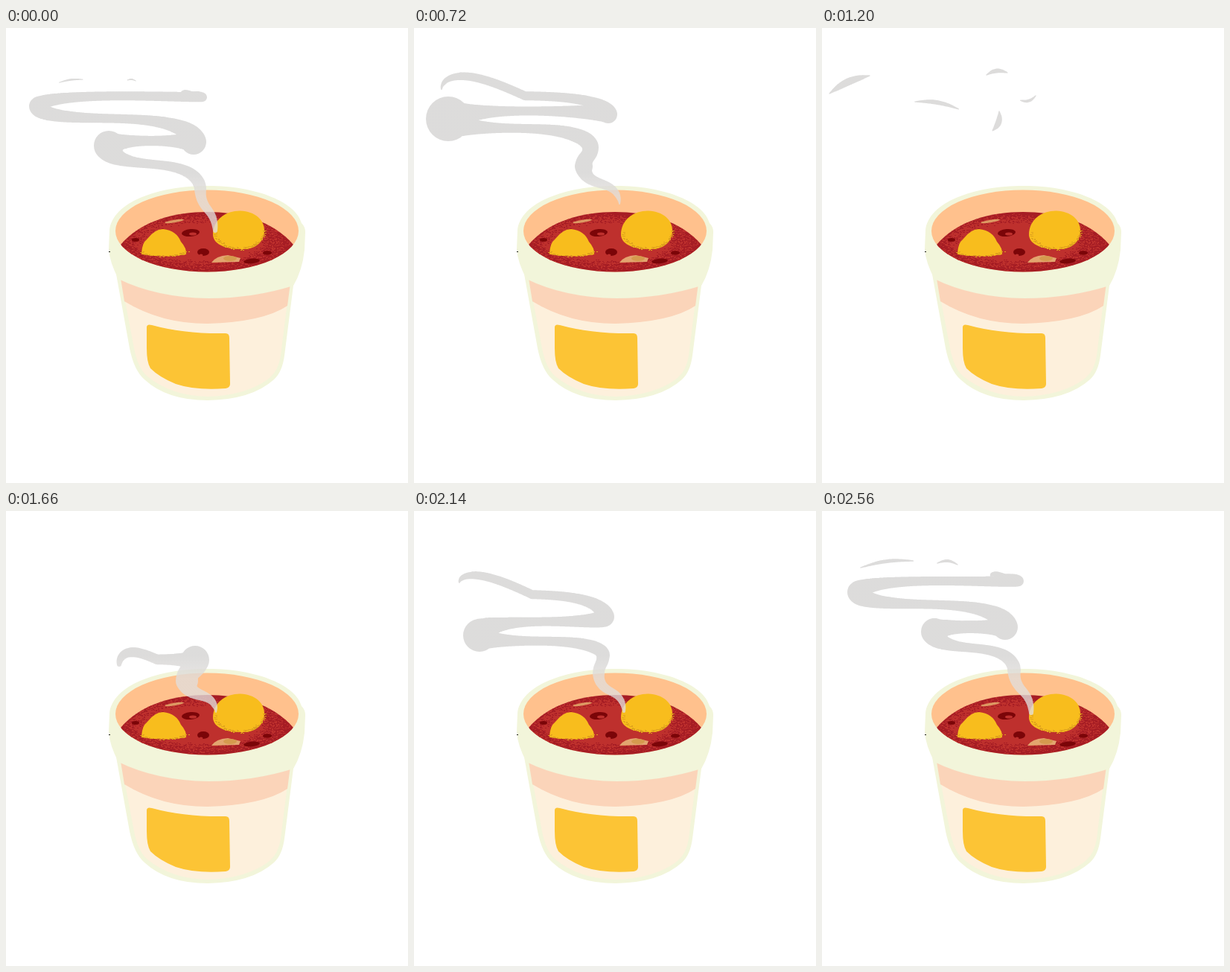
Animation of 540 by 611 pixels, one loop 2620 ms. Source, as an HTML page with a canvas:

```html
<!DOCTYPE html>
<html lang="en">
<head>
<meta charset="utf-8">
<title>Steaming soup</title>
<style>
html, body { margin: 0; width: 100%; height: 100%; overflow: hidden; background: #fff; }
canvas { display: block; }
</style>
</head>
<body>
<canvas id="stage" width="540" height="611"></canvas>
<script>
const W = 540, H = 611, LOOP = 2620;
const stage = document.getElementById('stage').getContext('2d');
const cup = document.createElement('canvas');
cup.width = W;
cup.height = H;

const lerp = (a, b, k) => a + (b - a) * k;
const clamp = (v, lo, hi) => Math.max(lo, Math.min(hi, v));

// The steam is one ribbon of bends that are born at the soup, rise and die at
// the top. A pose names its oldest bend, then gives [x, y, radius] down to the
// base. Bends already gone sit at the tip, bends still to come sit at the base.
const BENDS = 8, NECK = 6;

function pose(time, oldest, bends, thick = 1, cut = 0) {
  const last = bends.length - 1;
  const slots = Array.from({ length: BENDS }, (_, i) => {
    const n = i === BENDS - 1 ? last : clamp(i - oldest, 0, last);
    return [...bends[n], n === 0 ? 1 : 0];
  });
  return { time, slots, thick, cut };
}

const tall = [[236,88,1], [264,93,6], [43,105,12], [252,153,17], [138,158,20], [261,217,8], [281,272,3]];
const lifting = [[37,82,1], [261,116,12], [46,122,30], [237,161,11], [228,186,12], [276,236,1]];
const risen = lifting.map(([x, y, r]) => [x - 12, y - 14, r]);

const poses = [
  pose(0, 0, tall),
  pose(360, 2, [[49,98,1], [257,129,18], [84,142,32], [255,199,10], [251,222,11], [282,273,3]]),
  pose(720, 2, lifting),
  pose(1140, 2, risen, 0, 0.45),
  pose(1360, 0, [[281,270,1]], 0),
  pose(1660, 0, [[152,206,3], [254,200,19], [243,228,15], [282,270,1]]),
  pose(2140, 0, [[61,96,1], [256,142,13], [88,167,22], [254,194,9], [248,219,8], [282,269,2]]),
  pose(2560, 0, [[227,87,1], [264,94,7], [49,109,15], [246,156,17], [151,162,18], [258,214,9], [281,271,3]]),
  pose(LOOP, 0, tall)];

// Loose wisps: peak time, both ends, radius in the middle.
const wisps = [
  [360, 160, 77, 222, 83, 3],
  [1200, 10, 88, 64, 64, 5],
  [1200, 221, 63, 249, 60, 3],
  [1200, 125, 99, 184, 109, 3],
  [1200, 287, 91, 266, 97, 2],
  [1200, 238, 112, 229, 138, 4],
  [2560, 52, 76, 123, 67, 2.5],
  [2560, 155, 70, 182, 72, 2]];

function disc(path, x, y, r) {
  if (r < 0.5) return;
  path.moveTo(x + r, y);
  path.arc(x, y, r, 0, 7);
}

// Swings sideways from bend to bend, flat in between, with a wave in the tail.
function addRibbon(path, { slots, thick, cut }) {
  const end = (BENDS - 1) * (1 - cut);
  for (let i = 0; i < BENDS - 1; i++) {
    const [ax, ay, ar, wave] = slots[i], [bx, by, br] = slots[i + 1];
    const dx = Math.abs(bx - ax), dy = Math.abs(by - ay), length = Math.hypot(dx, dy);
    const flat = dx / (dx + dy + 1), steps = Math.ceil(length * 1.5) + 1;
    for (let j = 0; j <= steps; j++) {
      const k = j / steps;
      if (i + k > end) return;
      const arch = Math.sin(Math.PI * k), turn = Math.sin(2 * Math.PI * k);
      const lift = dx / 200 * (7 * arch + 22 * wave * Math.max(0, turn));
      const r = lerp(lerp(ar, br, k), NECK, arch * Math.min(1, length / 120));
      disc(path, lerp(ax, bx, (1 - Math.cos(Math.PI * k)) / 2),
        lerp(ay, by, k + flat * turn / (2 * Math.PI)) - lift, r * thick);
    }
  }
}

// A bowed sliver that grows, then shrinks towards its middle.
function addWisp(path, t, [peak, ax, ay, bx, by, radius]) {
  const age = (t - peak + LOOP) % LOOP;
  const size = age < 120 ? 1 - age / 120 : 1 - (LOOP - age) / 240;
  if (size <= 0) return;
  const length = Math.hypot(bx - ax, by - ay);
  for (let d = 0; d <= length; d++) {
    const arch = Math.sin(Math.PI * d / length);
    const k = 0.5 + (d / length - 0.5) * size, bow = 4 * arch * size / length;
    disc(path, lerp(ax, bx, k) + (by - ay) * bow, lerp(ay, by, k) - (bx - ax) * bow,
      lerp(0.7, radius, arch) * size);
  }
}

const steamTone = stage.createLinearGradient(0, 195, 0, 225);
steamTone.addColorStop(0, 'rgba(212,211,210,.8)');
steamTone.addColorStop(1, 'rgba(225,222,220,.78)');

function drawSteam(t) {
  const i = poses.findIndex(p => t < p.time) - 1, a = poses[i], b = poses[i + 1];
  const k = (t - a.time) / (b.time - a.time);
  const path = new Path2D();
  addRibbon(path, {
    slots: a.slots.map((slot, n) => slot.map((v, m) => lerp(v, b.slots[n][m], k))),
    thick: lerp(a.thick, b.thick, k),
    cut: lerp(a.cut, b.cut, k)
  });
  wisps.forEach(wisp => addWisp(path, t, wisp));
  stage.fillStyle = steamTone;
  stage.fill(path);
}

function drawCup(c) {
  let seed = 7;
  const random = () => (seed = seed * 16807 % 2147483647) / 2147483647;

  function oval(color, x, y, rx, ry, turn = 0) {
    c.beginPath();
    c.ellipse(x, y, rx, ry, turn, 0, 7);
    c.fillStyle = color;
    c.fill();
  }
  function shape(color, path) {
    c.fillStyle = color;
    c.fill(new Path2D(path));
  }
  // Grains scattered around part of an oval's edge.
  function grains(color, count, x, y, rx, ry, spread, sweep = 2 * Math.PI) {
    c.fillStyle = color;
    for (let i = 0; i < count; i++) {
      const a = random() * sweep;
      const d = 1 + (random() + random() - 1) * spread;
      c.fillRect(Math.round(x + rx * d * Math.cos(a)), Math.round(y + ry * d * Math.sin(a)), 2, 1);
    }
  }

  const green = '#f2f5da', dark = '#a61d24', red = '#be302d', spot = '#7b0508', yolk = '#f8bd1d';

  // Body
  shape(green, 'M147 325 L166 430 Q172 460 186 472 Q216 500 271 500 Q330 499 360 472 Q371 462 374 440 L388 330 Z');
  shape('#fdf0dc', 'M153 330 L172 430 Q177 457 190 468 Q222 494 271 495 Q325 493 354 470 Q366 460 369 440 L382 335 Z');
  shape('#fbd4b9', 'M153 330 L159 367 Q208 397 270 397 Q345 395 378 373 L383 335 Z');
  shape('#fcc435', 'M189 402 Q189 397 196 399 Q240 411 295 410 Q300 410 300 416 L301 478 Q301 483 295 484 ' +
    'Q255 487 228 478 Q206 469 194 457 Q189 449 189 430 Z');

  // Rim and opening
  shape(green, 'M139 272 C143 234 203 212 271 212 C339 212 390 235 397 262 Q402 267 402 274 L401 298 ' +
    'Q398 326 386 346 Q332 363 272 363 Q202 362 151 337 Q139 314 138 297 Z');
  shape('#111', 'M138 300 h2 v1 h-2 Z');
  oval('#ffc18d', 270, 272.5, 123, 55);

  // Soup
  c.save();
  c.beginPath();
  c.ellipse(270, 272.5, 123, 55, 0, 0, 7);
  c.clip();
  c.clip(new Path2D('M154 291 C182 258 228 247 270 247 S358 258 386 291 V335 H154 Z'));
  c.fillStyle = dark;
  c.fillRect(140, 240, 260, 95);
  oval(red, 262, 287, 91, 30);
  grains(red, 1500, 264, 287, 98, 32, 0.22);
  grains(dark, 450, 264, 287, 87, 28, 0.14);
  c.restore();

  oval('#dd9963', 226, 259.5, 13, 1.8, -0.16);
  oval(spot, 248, 275, 12, 5, -0.08);
  oval(red, 251, 276.5, 5, 2);
  oval(spot, 265, 301, 8, 5);
  oval(red, 262, 305, 2.5, 1.5);
  oval(spot, 174, 284.5, 5, 2.5);
  oval(spot, 351, 302, 6, 2.8);
  oval(spot, 330, 313, 11, 3.2, -0.1);
  shape('#e3a56f', 'M276 315 Q282 306 298 305 L315 309 L313 314 Z');
  oval('#d59a4e', 301, 309.5, 9, 3.5);

  // Potatoes
  shape(yolk, 'M278 278 C278 256 297 245 315 245.5 C334 246 348 258 347 273 C346 290 332 298 316 297 ' +
    'C298 297 279 292 278 278 Z');
  shape(yolk, 'M182 304 Q182 289 190 283 Q200 270 211 270 Q229 272 235 287 Q243 296 242 304 Q212 309 182 304 Z');
  grains('#dfa21d', 110, 313, 272, 33, 24, 0.09, Math.PI);
  grains('#dfa21d', 50, 212, 300, 29, 6, 0.2, Math.PI);
}

// Steps last 60 ms; the empty pause lasts 100 ms.
function stepTime(t) {
  return t < 1360 ? Math.min(Math.floor(t / 60) * 60, 1260)
    : 1360 + Math.floor((t - 1360) / 60) * 60;
}

let shownStep = -1;
function draw(t) {
  const step = stepTime(t);
  if (step === shownStep) return;
  shownStep = step;
  stage.fillStyle = '#fff';
  stage.fillRect(0, 0, W, H);
  stage.drawImage(cup, 0, 0);
  drawSteam(step);
}

drawCup(cup.getContext('2d'));
draw(0);
let begin;
function tick(now) {
  begin ??= now;
  draw(Math.max(0, now - begin) % LOOP);
  requestAnimationFrame(tick);
}
requestAnimationFrame(tick);
</script>
</body>
</html>
```
